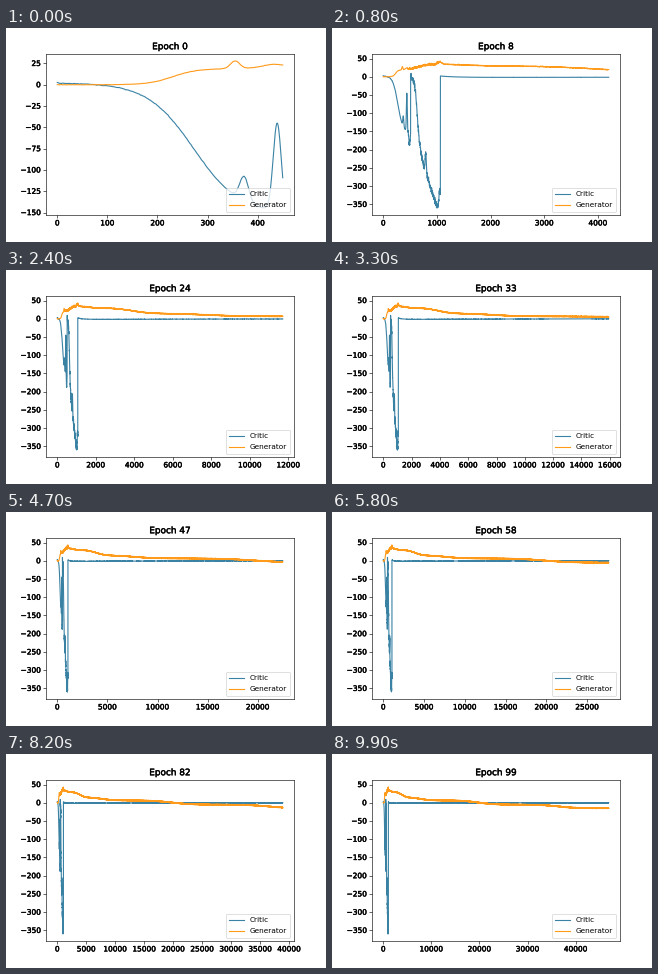
A matplotlib script that plays this animation: 320 by 214 pixels, repeating every 10000 ms.

```python
import matplotlib.pyplot as plt
import numpy as np
from matplotlib.animation import FuncAnimation
from matplotlib.patheffects import withStroke

EPOCHS = 100
STEPS = 469      # iterations per epoch
LAST_LOG = 450   # last logged iteration within an epoch
SETTLED = 1065   # iteration where the critic recovers for good

rng = np.random.default_rng(4)
s = np.arange((EPOCHS - 1) * STEPS + LAST_LOG + 1)


def rise(at, width):
    """Logistic step from 0 to 1."""
    return 0.5 + 0.5 * np.tanh((s - at) / (2 * width))


def bump(at, width):
    return np.exp(-0.5 * ((s - at) / width) ** 2)


def jitter(calm, rough, settled):
    """Lightly smoothed noise with one level per training phase."""
    level = np.select([s <= LAST_LOG, s < SETTLED], [calm, rough], settled)
    raw = rng.normal(size=len(s))
    return level * np.convolve(raw, [0.4, 0.7, 0.4], mode="same")


def critic_loss():
    first_dive = (2.2 + np.exp(-s / 2) - 154 * rise(272, 46)
                  + 29 * bump(373, 9) + 103 * bump(439, 8)
                  - 35 * bump(488, 12))
    second_dive = (-215 * rise(635, 25) - 0.46 * np.maximum(s - 690, 0)
                   + 55 * bump(792, 10) + 70 * bump(1055, 20))
    flat = (4 * np.exp(-np.maximum(s - SETTLED, 0) / 300)
            - 2.2 * np.exp(-s / 9000))
    loss = np.select([s < 510, s < SETTLED], [first_dive, second_dive], flat)
    return np.maximum(loss + jitter(0.2, 4, 0.1), -359.6)


def generator_loss():
    climb = 18.5 * rise(230, 24) + 17 * rise(640, 90)
    peaks = 9 * bump(355, 9) + 4 * bump(432, 22) + 6 * bump(1050, 40)
    decline = (6 * rise(1500, 250) + 15 * rise(3900, 450)
               + 8 * rise(7800, 900) + 11.8 * rise(19800, 1700)
               + 9.7 * rise(36500, 1800))
    return np.minimum(climb + peaks - decline + jitter(0.1, 1.6, 0.45), 43.8)


critic, generator = critic_loss(), generator_loss()

dpi = 160 / 3
fig, ax = plt.subplots(figsize=(320.001 / dpi, 214.001 / dpi), dpi=dpi)
fig.subplots_adjust(bottom=0.125)
critic_line, = ax.plot([], [], color="#3a82a4", label="Critic")
generator_line, = ax.plot([], [], color="#ff9a1a", label="Generator")
ax.legend(loc="lower right", labelspacing=0.64, borderpad=0.45)
title = ax.set_title("")
heavy = [withStroke(linewidth=0.6, foreground="black")]


def update(epoch):
    n = epoch * STEPS + LAST_LOG + 1
    critic_line.set_data(s[:n], critic[:n])
    generator_line.set_data(s[:n], generator[:n])
    ax.relim()
    ax.autoscale_view()
    title.set_text(f"Epoch {epoch}")
    for text in [title, *ax.get_xticklabels(), *ax.get_yticklabels()]:
        text.set_path_effects(heavy)
    return critic_line, generator_line, title


anim = FuncAnimation(fig, update, frames=EPOCHS, interval=100,
                     repeat=True, repeat_delay=0, blit=False)
plt.show()
```
